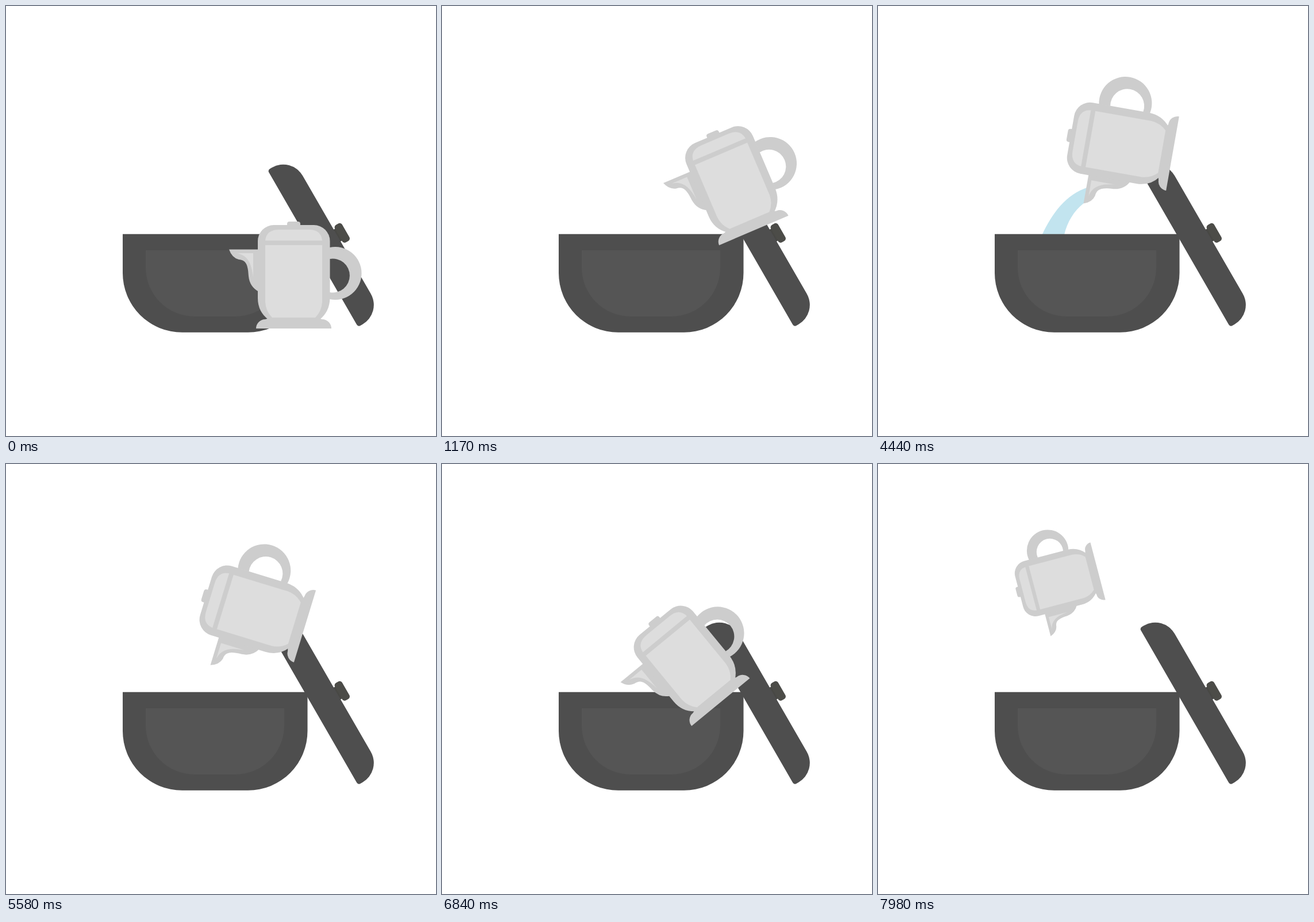
Recreate the animation shown at these times as an HTML page. Size 748 by 748 pixels, loop 8 s.

```html
<!DOCTYPE html>
<html lang="en">
<head>
<meta charset="utf-8">
<title>Kettle and bowl</title>
<style>
  html, body { margin: 0; height: 100%; overflow: hidden; background: #fff; }
  svg { display: block; width: 100%; height: 100%; }
</style>
</head>
<body>
<svg viewBox="0 0 748 748">
  <g transform="translate(455 285.5) rotate(60)" fill="#4e4e4e">
    <rect x="147" y="-54" width="24" height="8" fill="#484845"/>
    <rect x="142" y="-65" width="35" height="14.5" rx="5" fill="#4c4c48"/>
    <path d="M5 0H310Q315 0 315 -5V-9A39 39 0 0 1 276 -48H39A39 39 0 0 1 0 -9V-5Q0 0 5 0Z" id="lid"/>
  </g>
  <path id="water" fill="#c1e4ef" d="M366 315C326 328 303 361 285.5 398H324C329 376 341 356 358 343Z"/>
  <path fill="#4e4e4e" d="M203 396.7H524.5V464A103.5 103.5 0 0 1 421 567.8H306.5A103.5 103.5 0 0 1 203 464Z"/>
  <path fill="#555" d="M243 425H484V455A85 85 0 0 1 399 540H328A85 85 0 0 1 243 455Z"/>
  <g id="kettle" fill="#cdcdcd">
    <path d="M563 420A46 46 0 1 1 563 510V498A29.5 29.5 0 1 0 563 440Z"/>
    <path d="M388 423.5H440V497Q424 489 422 470C421 449 417 442 405 441Q393 438 388 423.5Z"/>
    <rect x="489" y="375" width="23" height="12" rx="4"/>
    <path d="M438 409A28 28 0 0 1 466 381H535.5A28 28 0 0 1 563.5 409V508Q563 532 545 546H457Q438 532 438 508Z"/>
    <path d="M435 561A16 16 0 0 1 451 545L461 542H540L550 545A16 16 0 0 1 566 561Z"/>
    <g fill="#ddd">
      <path d="M402 430H430V472C427 446 420 434 402 430Z"/>
      <path d="M451 408Q453 389 475 389H527Q548 389 550 408Z"/>
      <path d="M451 416H550V515Q549 531 538 542H463Q452 531 451 515Z"/>
    </g>
  </g>
</svg>
<script>
const LOOP = 8000, STEP = 30;
const LIFT = 870, POUR = 1800, BACK = 5430, STIR = 6300, LEAVE = 7500, END = 7980;
const kettle = document.getElementById('kettle');
const water = document.getElementById('water');

// The rounded side of the lid faces away from the bowl
const lid = document.getElementById('lid');
lid.setAttribute('d', lid.getAttribute('d').replaceAll('0 0 1', '0 0 0'));

const part = (t, from, to) => Math.min(1, Math.max(0, (t - from) / (to - from)));
const mix = (a, b, p) => a + (b - a) * p;

// Place of the spout tip, tilt in degrees and scale
function pose(t) {
  if (t < BACK) {
    const p = part(t, LIFT, POUR), e = p ** 1.1;
    return [388 - 31 * p * p, 423 - 130 * part(t, 0, LIFT) + 50.5 * e, 80 * e, 1];
  }
  if (t < STIR) {
    const p = part(t, BACK, STIR);
    return [mix(357, 346, p), mix(343.5, 379, p), mix(80, 39.4, p), 1];
  }
  if (t < LEAVE) {
    const swing = (t - STIR) / 400 % 2;
    return [291 + 55 * Math.abs(1 - swing), 379, 39.4, 1];
  }
  const e = part(t, LEAVE, END) ** 1.65;
  return [mix(291, 300, e) + 178 * e * (1 - e), mix(379, 299.5, e),
    mix(39.4, 104.7, e), mix(1, 0.787, e)];
}

function draw(now) {
  const time = now % LOOP;
  const t = time - time % STEP;
  const [x, y, tilt, scale] = pose(t);
  kettle.setAttribute('transform',
    `translate(${x} ${y}) rotate(${-tilt}) scale(${scale}) translate(-388 -423)`);
  water.setAttribute('opacity', Math.min(part(t, POUR, 4500), part(t, BACK, 4500)));
}

const start = performance.now();
function tick() {
  draw(performance.now() - start);
  requestAnimationFrame(tick);
}
tick();
</script>
</body>
</html>
```
